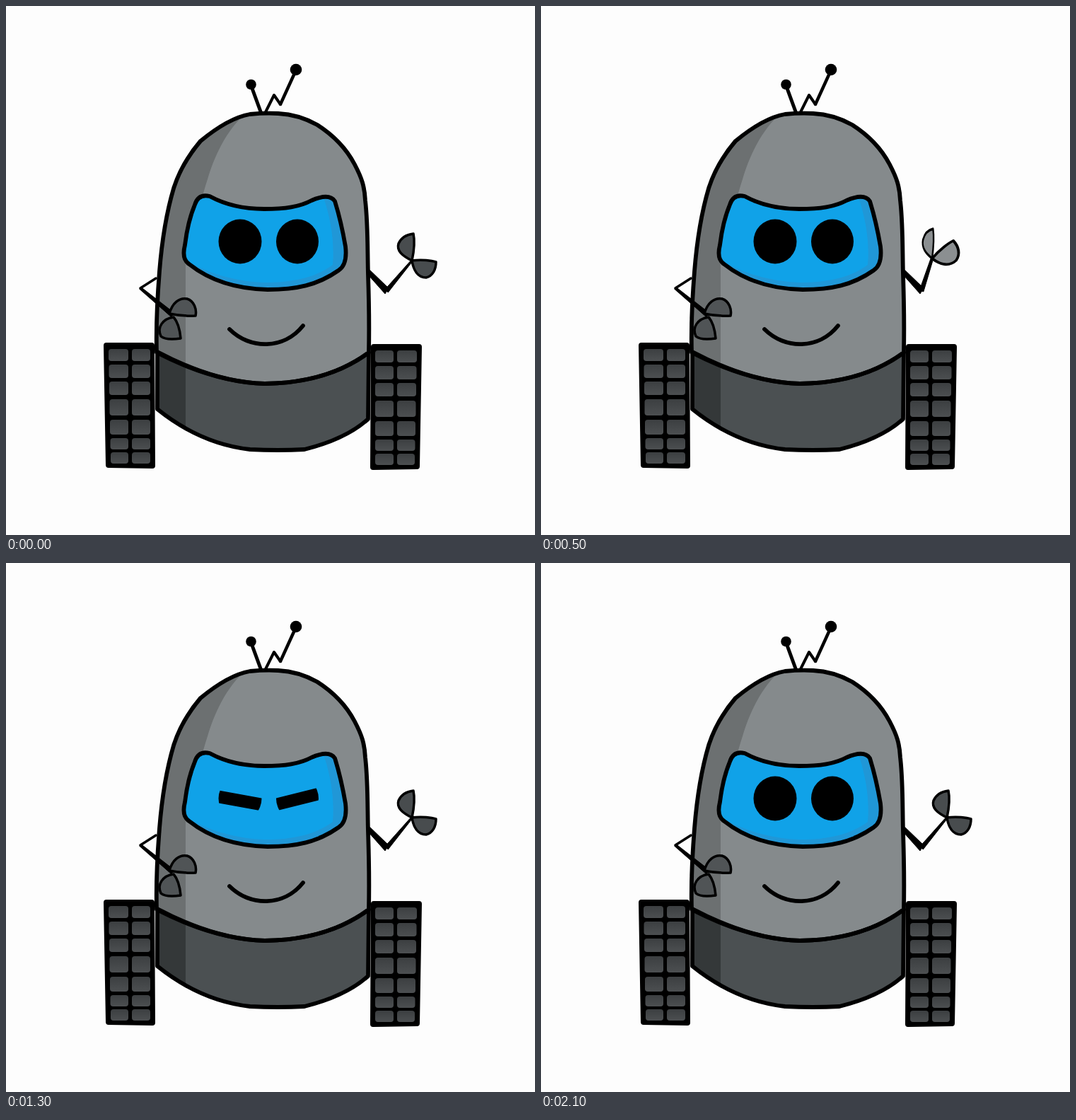
Write an HTML page that moves like this. It is 748 px wide and 748 px high and loops after 2300 ms.

```html
<!DOCTYPE html>
<html lang="en">
<head>
<meta charset="utf-8">
<title>Waving robot</title>
<style>
  html, body { margin: 0; width: 100%; height: 100%; overflow: hidden; background: #fdfdfd; }
  svg { display: block; width: 100%; height: 100%; }
  .ink { fill: none; stroke: #000; stroke-width: 5.8; stroke-linecap: round; stroke-linejoin: round; }
  .claw { stroke: #000; stroke-width: 3.5; stroke-linejoin: round; }
</style>
</head>
<body>
<svg viewBox="0 0 748 748">
  <defs>
    <linearGradient id="tread" x2="0" y2="1">
      <stop stop-color="#3c3f41"/><stop offset="1" stop-color="#4c4f51"/>
    </linearGradient>
    <path id="shell" d="M213 490C212 450 215 400 217 375C221 325 229 285 237 258C245 233 258 211 275 191C298 172 322 157 345 153Q366 151 385 152C405 153 422 158 440 168C465 184 482 203 493 224C503 243 507 255 508 275C512 310 511 345 512 380Q514 440 513 490Q455 533 366 534Q295 532 213 490Z"/>
    <path id="base" d="M214 489Q295 532 366 534Q455 533 513 490L512 584C490 604 462 617 422 627Q385 629 345 627C300 622 255 603 214 570Z"/>
    <path id="visor" d="M267 281Q272 265 288 269C312 282 340 287 365 287C395 287 415 284 432 275Q457 264 465 276Q474 305 480 340Q483 366 470 374C440 395 410 401 370 401C325 400 288 388 259 365Q248 358 253 338Q257 305 267 281Z"/>
    <clipPath id="inShell"><use href="#shell"/></clipPath>
    <clipPath id="inBase"><use href="#base"/></clipPath>
    <clipPath id="inVisor"><use href="#visor"/></clipPath>
    <clipPath id="lids"><path id="lidGap"/></clipPath>
    <g id="track">
      <path d="M142 480H206L207 650L145 649Z" stroke="#000" stroke-width="8" stroke-linejoin="round"/>
      <g id="tiles" fill="url(#tread)"/>
    </g>
  </defs>

  <!-- antennas -->
  <g class="ink">
    <path d="M346 111L361 152" style="stroke-width:5"/>
    <path d="M409 93L388 139" style="stroke-width:4.5"/>
    <path d="M388 139L379 126L366 152" style="stroke-width:4"/>
  </g>
  <circle cx="346.500" cy="111" r="7.300"/>
  <circle cx="410" cy="90" r="8.300"/>

  <!-- body -->
  <use href="#base" fill="#4b5052"/>
  <path clip-path="url(#inBase)" fill="#343839" d="M200 480H254V640H200Z"/>
  <use href="#shell" fill="#858a8c"/>
  <path clip-path="url(#inShell)" fill="#6c7071" d="M342 150C312 172 293 217 285 245Q276 272 268 310L254 355V540H190V140Z"/>
  <use href="#base" class="ink"/>
  <use href="#shell" class="ink"/>

  <!-- face -->
  <use href="#visor" fill="#10a2e8"/>
  <path clip-path="url(#inVisor)" fill="#2097d7" d="M446 262C458 295 465 330 462 366C435 386 400 391 365 391Q310 389 262 364V410H490V262Z"/>
  <use href="#visor" class="ink"/>
  <g clip-path="url(#lids)">
    <ellipse cx="331" cy="333" rx="30.500" ry="31.500"/>
    <ellipse cx="412" cy="333" rx="30" ry="31.500"/>
  </g>
  <path class="ink" d="M316 457C345 486 393 486 420 452"/>

  <use href="#track"/>
  <use href="#track" transform="translate(726 2) scale(-1 1)"/>

  <!-- arm on the left -->
  <path id="leftUpper" class="ink" style="stroke-width:3.500"/>
  <path id="leftFore" stroke="#000" stroke-linejoin="round"/>
  <g id="leftHand" class="claw" fill="#505456">
    <path d="M-5-2C-1-17 9-25 20-23C30-20 34-8 32 1Q14 2-5-2Z"/>
    <path d="M1 3C-14 5-23 17-17 30C-10 36 4 34 11 33Q9 12 1 3Z"/>
  </g>

  <!-- arm on the right -->
  <path d="M512 371L541 399L536 407L512 380Z" stroke="#000" stroke-linejoin="round"/>
  <path id="rightFore" stroke="#000" stroke-linejoin="round"/>
  <g id="rightHand" class="claw">
    <path id="upperClaw" d="M0 0C-14-7-22-14-19-24C-15-33-6-37 2-38C4-29 3-14 0 0Z"/>
    <path id="lowerClaw" d="M0 0C14-2 28 0 34 2C34 13 29 22 20 24C8 24 2 13 0 0Z"/>
  </g>
</svg>
<script>
const $ = id => document.getElementById(id);
const set = (id, name, value) => $(id).setAttribute(name, value);

// tread rows: top and height
const rows = [[485, 17], [507, 19], [531, 19], [556, 23], [585, 21], [611, 16], [631, 16]];
$('tiles').innerHTML = rows.map(([y, h], i) => {
  const x = 145 + i * 0.5;
  return `<rect x="${x}" y="${y}" width="${173 - x}" height="${h}" rx="4"/>` +
    `<rect x="178" y="${y}" width="26" height="${h}" rx="4"/>`;
}).join('');

// limb that changes width from a to b
function limb([ax, ay], [bx, by], wa, wb) {
  const len = Math.hypot(bx - ax, by - ay);
  const nx = (ay - by) / len / 2, ny = (bx - ax) / len / 2;
  return `M${ax + nx * wa} ${ay + ny * wa}L${bx + nx * wb} ${by + ny * wb}` +
    `L${bx - nx * wb} ${by - ny * wb}L${ax - nx * wa} ${ay - ny * wa}Z`;
}

const dark = '#484c4e', light = '#8b8f91';
const rightPoses = [
  { wrist: [574, 360], upper: '', lower: '', fill: dark, width: 2.5 },
  { wrist: [553, 357], upper: 'scale(.68 1.1)', lower: 'rotate(-43) scale(1.15 1.05)', fill: light, width: 3.5 },
  { wrist: [530, 339], upper: 'rotate(-9) scale(.8 1.15)', lower: 'rotate(-50) scale(1.28 1.03)', fill: dark, width: 4 },
  { wrist: [504, 325], upper: 'rotate(-18) scale(.95 1.2)', lower: 'rotate(-58) scale(1.4 1)', fill: dark, width: 5 }
];
const leftPoses = [
  { elbow: [190, 399], wrist: [236, 437], turn: 0 },
  { elbow: [196, 394], wrist: [207, 438], turn: 36 },
  { elbow: [194, 394], wrist: [186, 435], turn: 60 }
];
const lidGaps = [50, 18, 9, 4];

// one digit per 100 ms
const rightSteps = '01232110000000000000000';
const leftSteps  = '00000000121000000000000';
const eyeSteps   = '00000000000012321012100';

function poseRight({ wrist, upper, lower, fill, width }) {
  set('rightFore', 'd', limb([538, 403], wrist, 6, width));
  set('rightHand', 'transform', `translate(${wrist})`);
  set('rightHand', 'fill', fill);
  set('upperClaw', 'transform', upper);
  set('lowerClaw', 'transform', lower);
}

function poseLeft({ elbow, wrist, turn }) {
  const [x, y] = elbow;
  set('leftUpper', 'd', `M212 385L${x} ${y}`);
  set('leftFore', 'd', limb(elbow, wrist, 3.5, 7));
  set('leftHand', 'transform', `translate(${wrist}) rotate(${turn})`);
}

function poseEyes(h) {
  set('lidGap', 'd', `M298 ${330 - h}L364 ${342 - h}V${342 + h}L298 ${330 + h}Z` +
    `M380 ${342 - h}L444 ${326 - h}V${326 + h}L380 ${342 + h}Z`);
}

let shown = -1;
function draw() {
  const step = Math.floor(performance.now() % 2300 / 100);
  if (step !== shown) {
    shown = step;
    poseRight(rightPoses[rightSteps[step]]);
    poseLeft(leftPoses[leftSteps[step]]);
    poseEyes(lidGaps[eyeSteps[step]]);
  }
  requestAnimationFrame(draw);
}
draw();
</script>
</body>
</html>
```
